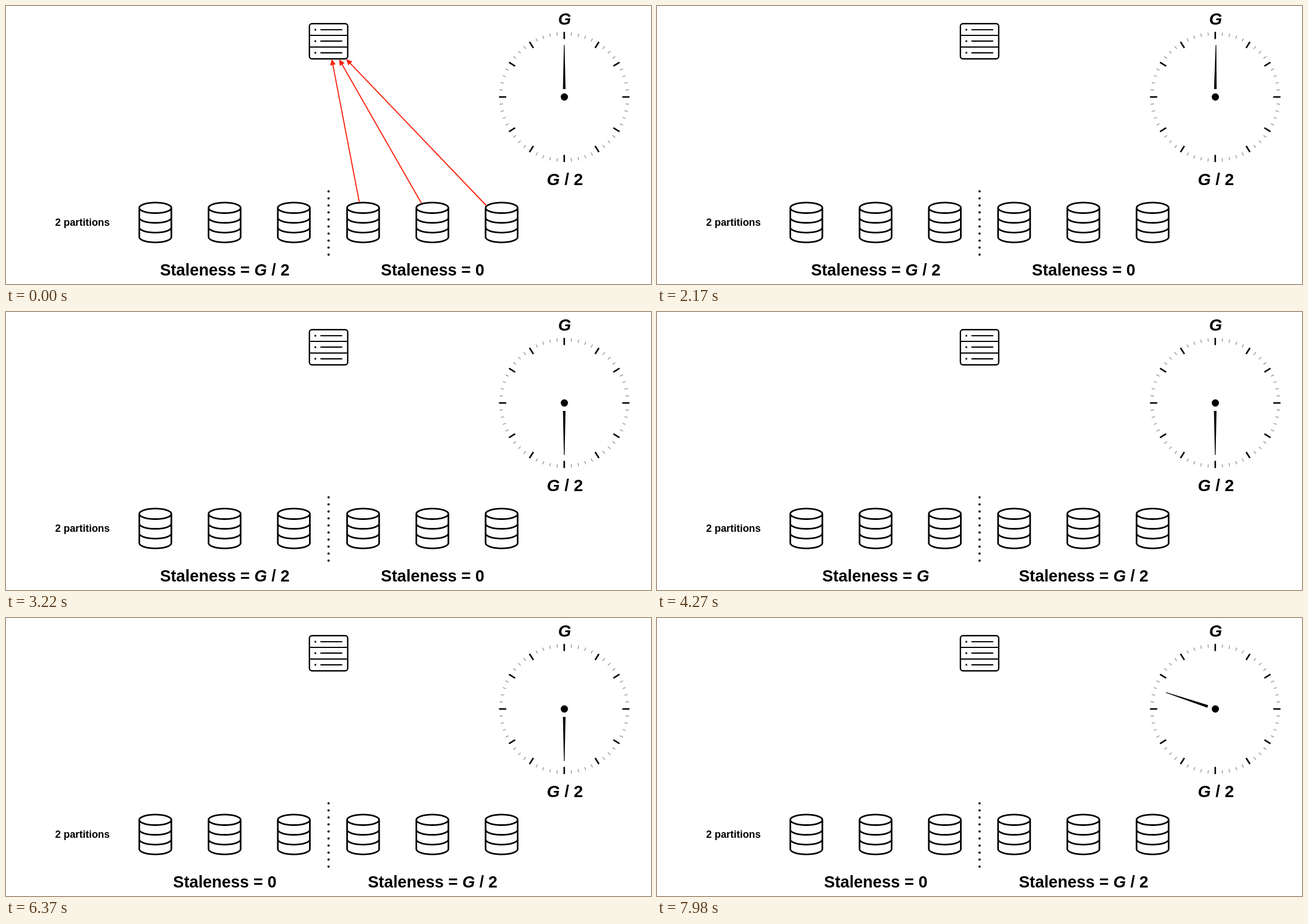
These frames come from a looping animation (1139x492 px, 8000 ms). An HTML page with a canvas:

```html
<!DOCTYPE html>
<html lang="en">
<head>
<meta charset="utf-8">
<title>Staleness clock</title>
<style>
  html, body { margin: 0; width: 100%; height: 100%; overflow: hidden; background: #fff; }
  canvas { display: block; }
</style>
</head>
<body>
<canvas id="stage" width="1139" height="492"></canvas>
<script>
const W = 1139, H = 492, LOOP = 8000, STEP = 70;
const INK = '#000', RED = '#fa230d';
const FONT = '"Liberation Sans", Arial, Helvetica, sans-serif';
const CLOCK = { x: 985.8, y: 161 };
const ctx = document.getElementById('stage').getContext('2d');

function stroke(width, color = INK) {
  ctx.lineWidth = width;
  ctx.strokeStyle = color;
  ctx.stroke();
}

function line(x1, y1, x2, y2, width, color) {
  ctx.beginPath();
  ctx.moveTo(x1, y1);
  ctx.lineTo(x2, y2);
  stroke(width, color);
}

function dot(x, y, r) {
  ctx.beginPath();
  ctx.arc(x, y, r, 0, 2 * Math.PI);
  ctx.fillStyle = INK;
  ctx.fill();
}

// Centred bold text in which every "G" is italic.
function label(text, cx, y, size) {
  const runs = text.split(/(G)/).filter(Boolean).map(s => {
    const font = `${s === 'G' ? 'italic ' : ''}bold ${size}px ${FONT}`;
    ctx.font = font;
    return { s, font, w: ctx.measureText(s).width };
  });
  let x = cx - runs.reduce((sum, r) => sum + r.w, 0) / 2;
  ctx.fillStyle = INK;
  for (const r of runs) {
    ctx.font = r.font;
    ctx.fillText(r.s, x, y);
    x += r.w;
  }
}

function server() {
  ctx.beginPath();
  ctx.roundRect(535.8, 31.2, 67.6, 62.3, 4.5);
  stroke(2.4);
  line(536, 52, 603, 52, 2.2);
  line(536, 72.6, 603, 72.6, 2.2);
  ctx.lineCap = 'round';
  for (const y of [42, 62.2, 82.8]) {
    dot(546.3, y, 1.7);
    line(556, y, 593, y, 2.2);
  }
  ctx.lineCap = 'butt';
}

function database(cx) {
  const rx = 28.3, ry = 9.3, top = 357.2, gap = 17.3, bottom = top + 3 * gap;
  ctx.beginPath();
  ctx.ellipse(cx, top, rx, ry, 0, 0, 2 * Math.PI);
  for (let i = 1; i <= 3; i++) {
    ctx.moveTo(cx + rx, top + i * gap);
    ctx.ellipse(cx, top + i * gap, rx, ry, 0, 0, Math.PI);
  }
  for (const x of [cx - rx, cx + rx]) {
    ctx.moveTo(x, top);
    ctx.lineTo(x, bottom);
  }
  stroke(2.9);
}

function clockFace() {
  ctx.save();
  ctx.translate(CLOCK.x, CLOCK.y);
  for (let i = 0; i < 56; i++) {
    const major = [0, 5, 9].includes(i % 14);
    if (major) line(0, -102.5, 0, -115.2, 2.7);
    else line(0, -109, 0, -115, 1.2, '#858585');
    ctx.rotate(2 * Math.PI / 56);
  }
  ctx.restore();
  dot(CLOCK.x + 0.2, CLOCK.y, 6.4);
  label('G', 986.5, 33, 29.5);
  label('G / 2', 987, 316.5, 29.5);
}

function hand(angle) {
  ctx.save();
  ctx.translate(CLOCK.x, CLOCK.y);
  ctx.rotate(angle);
  ctx.beginPath();
  ctx.moveTo(-2.3, -14);
  ctx.lineTo(-0.6, -92);
  ctx.lineTo(0.6, -92);
  ctx.lineTo(2.3, -14);
  ctx.closePath();
  ctx.fillStyle = INK;
  ctx.fill();
  ctx.restore();
}

function arrow(x1, y1, x2, y2) {
  const len = Math.hypot(x2 - x1, y2 - y1);
  ctx.save();
  ctx.translate(x2, y2);
  ctx.rotate(Math.atan2(y2 - y1, x2 - x1));
  line(-len, 0, -8, 0, 1.9, RED);
  ctx.beginPath();
  ctx.moveTo(0, 0);
  ctx.lineTo(-10.5, -5);
  ctx.lineTo(-10.5, 5);
  ctx.closePath();
  ctx.fillStyle = RED;
  ctx.fill();
  ctx.restore();
}

function arrows(mirrored) {
  ctx.save();
  if (mirrored) {
    ctx.translate(W, 0);
    ctx.scale(-1, 1);
  }
  arrow(623.8, 346.5, 575.3, 94);
  arrow(733.3, 348.5, 588.3, 94.3);
  arrow(848, 353, 600.8, 94);
  ctx.restore();
}

// Half a turn, eased and advanced in fixed ticks; lead is the head start in ms.
function halfTurn(t, start, lead) {
  if (t < start) return 0;
  const elapsed = Math.floor((t - start) / STEP) * STEP + lead;
  const u = Math.min(1, elapsed / 1000);
  return Math.PI * (0.5 - 0.5 * Math.cos(Math.PI * u));
}

function draw(t) {
  ctx.fillStyle = '#fff';
  ctx.fillRect(0, 0, W, H);

  server();
  for (let i = 0; i < 6; i++) database(263.7 + i * 122.3);
  for (let i = 0; i < 10; i++) dot(569.6, 328 + i * 12.45, 2);
  clockFace();
  hand(halfTurn(t, 2170, 42) + halfTurn(t, 7420, 6));

  label('2 partitions', 135, 389.3, 17.9);
  const left = t < 4270 ? 'G / 2' : t < 5320 ? 'G' : '0';
  const right = t < 4270 ? '0' : 'G / 2';
  label('Staleness = ' + left, 386.3, 476.5, 28.7);
  label('Staleness = ' + right, 753.4, 476.5, 28.7);

  if (t < 1120) arrows(false);
  else if (t >= 5320 && t < 6370) arrows(true);
}

function tick() {
  draw(performance.now() % LOOP);
  requestAnimationFrame(tick);
}
tick();
</script>
</body>
</html>
```
